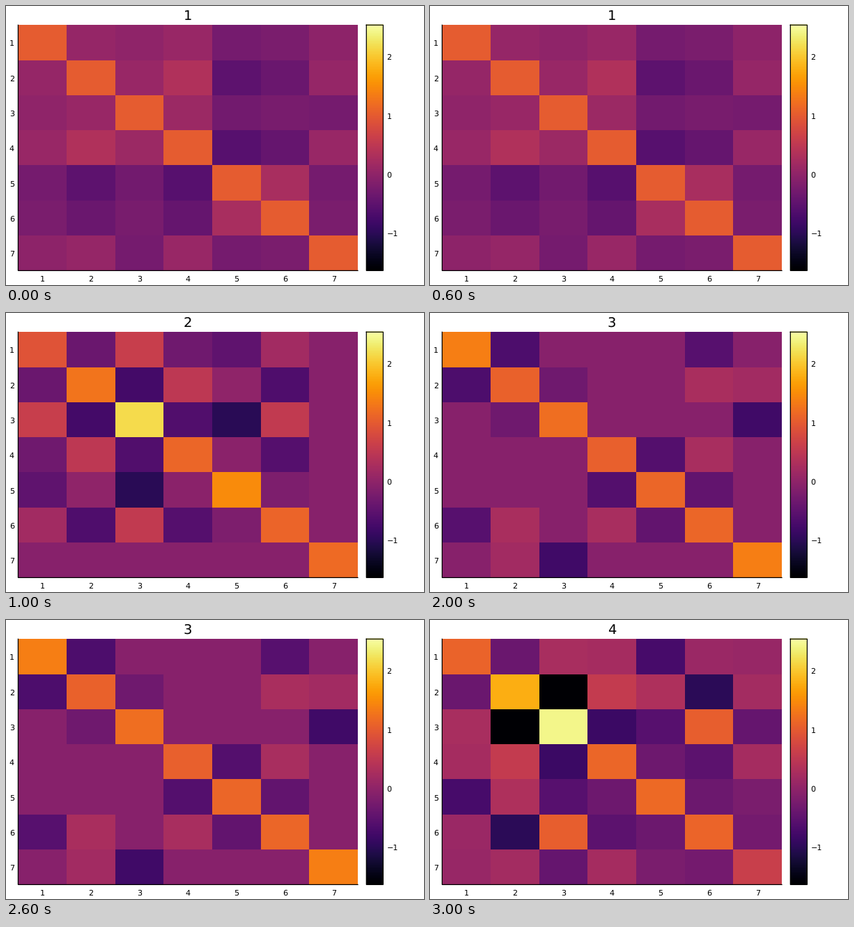
A matplotlib script that plays this animation: 600x400 px, repeating every 4 s.

```python
import numpy as np
import matplotlib.pyplot as plt
from matplotlib.animation import FuncAnimation

plt.rcParams.update({"font.family": "DejaVu Sans", "text.hinting": "none",
                     "path.snap": False})

W, H, DPI = 600, 400, 100
N = 7
LEFT, RIGHT, TOP, BOTTOM = 17.4, 505, 27.3, 379.4
BAR_LEFT, BAR_RIGHT = 517.3, 541.4
VMIN, VMAX = -1.645, 2.54


def covariance(noise, *factors):
    """Factor model: shared loadings plus independent noise."""
    cov = np.full((N, N), -.1)
    np.fill_diagonal(cov, noise)
    for factor in factors:
        loading = np.zeros(N)
        for variable, weight in factor.items():
            loading[variable - 1] = weight
        cov += np.outer(loading, loading)
    return cov


matrices = [
    covariance(.5, {1: .25, 2: .6, 3: .3, 4: .7, 5: -.7, 6: -.5, 7: .25},
               {3: .5, 7: -.5}),
    covariance(.6, {1: .55, 2: -.55, 3: 1.25, 4: -.45, 5: -.75, 6: .5},
               {2: .6, 4: .55, 5: -.55, 6: -.5}, {7: .75}),
    covariance(.55, {1: .9, 2: -.65, 6: -.55}, {2: -.3, 3: .8, 7: -.9},
               {4: .7, 5: -.75, 6: .5}),
    covariance(.45, {1: .25, 2: -1.15, 3: 1.4, 4: -.55, 5: -.35, 6: .8, 7: -.25},
               {1: .75, 4: .6, 5: -.75, 7: .3}),
]
np.fill_diagonal(matrices[0], 1)  # the first one is a pure correlation matrix

fig = plt.figure(figsize=(W / DPI, H / DPI), dpi=DPI, facecolor="white")
ax = fig.add_axes([0, 0, 1, 1])
ax.axis("off")


def line(xs, ys, width=1.25):
    ax.plot(xs, ys, color="black", lw=width * 72 / DPI,
            solid_capstyle="projecting", solid_joinstyle="miter")


def label(x, y, text, size=8, ha="center"):
    return ax.text(x, y, text, size=size, ha=ha, va="center_baseline")


style = dict(cmap="inferno", vmin=VMIN, vmax=VMAX)
heat = ax.pcolormesh(np.round(np.linspace(LEFT, RIGHT, N + 1)),
                     np.round(np.linspace(TOP, BOTTOM, N + 1)),
                     matrices[0], antialiased=False, **style)
ax.imshow(np.linspace(VMAX, VMIN, 256)[:, None], aspect="auto",
          extent=(BAR_LEFT, BAR_RIGHT, BOTTOM, TOP), **style)
ax.set(xlim=(0, W), ylim=(H, 0))

line([LEFT, LEFT, RIGHT], [TOP, BOTTOM, BOTTOM])
line([BAR_LEFT, BAR_RIGHT, BAR_RIGHT, BAR_LEFT, BAR_LEFT],
     [TOP, TOP, BOTTOM, BOTTOM, TOP])

for i in range(N):
    mid = (i + .5) / N
    label(LEFT + mid * (RIGHT - LEFT), 391, str(i + 1))
    label(12, TOP + mid * (BOTTOM - TOP) + .7, str(i + 1), ha="right")

for v in (-1, 0, 1, 2):
    y = BOTTOM - (v - VMIN) / (VMAX - VMIN) * (BOTTOM - TOP)
    label(546.5, y + .5, str(v).replace("-", "\u2212"), ha="left")

title = label((LEFT + RIGHT) / 2, 12.6, "1", size=14)


def update(i):
    heat.set_array(matrices[i])
    title.set_text(str(i + 1))
    return heat, title


anim = FuncAnimation(fig, update, frames=len(matrices), interval=1000,
                     repeat=True, repeat_delay=0)
plt.show()
```
